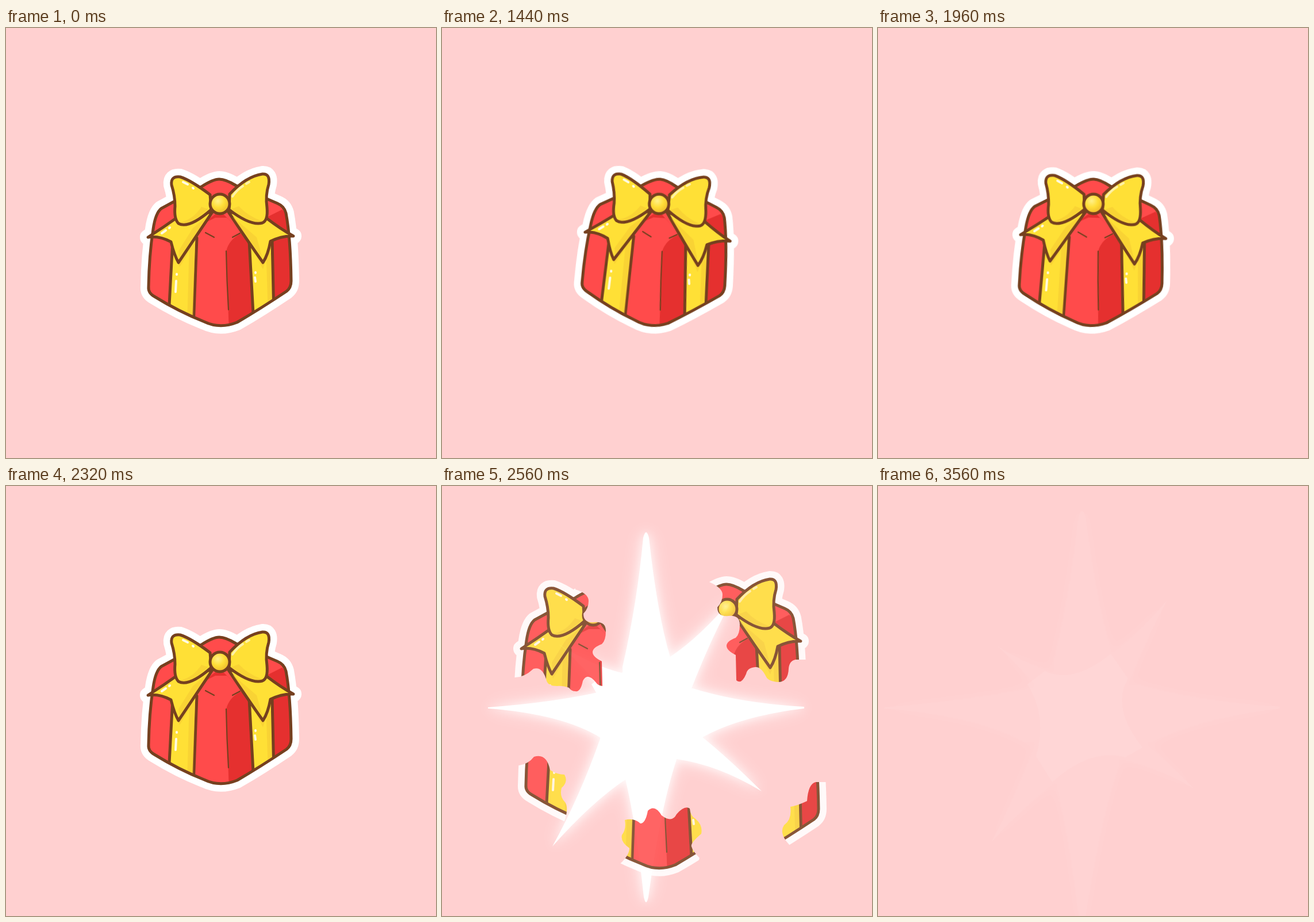
Animation, 748 px wide and 748 px high, one loop 3600 ms. Source, as an HTML page without scripts:

```html
<!DOCTYPE html>
<html lang="en">
<head>
<meta charset="utf-8">
<title>Gift burst</title>
<style>
html, body { margin: 0; width: 100%; height: 100%; overflow: hidden; background: #ffd0d0; }
svg { display: block; width: 100vw; height: 100vh; }
#gift { filter: blur(.6px); }
.line { stroke: #75401f; stroke-width: 5; stroke-linejoin: round; stroke-linecap: round; }
.thin { fill: none; stroke: #75401f; stroke-width: 2.2; stroke-linecap: round; }
.gold { fill: #ffe036; }
.shade { fill: #f4c832; opacity: .5; }
.shine { fill: none; stroke: #fffbe4; stroke-width: 4; stroke-linecap: round; }
.rim { fill: #fff; stroke: #fff; stroke-width: 28; stroke-linejoin: round; }

.gift { transform-origin: 374px 386px; animation: shake 3.6s infinite, gone 3.6s step-end infinite; }
.piece {
  transform: translate(calc(var(--x) * var(--k)), calc(var(--y) * var(--k)));
  animation: fly 3.6s step-end infinite;
}
.star { filter: drop-shadow(0 0 8px #fffc) drop-shadow(0 0 15px #fff9); animation: fade 3.6s infinite; --end: .08; }
.core { animation: fade 3.6s infinite; --end: .07; }
.ray { transform-origin: 355px 386px; animation: grow 3.6s infinite; }

@keyframes shake {
  0%, 30%, 44.444%, 50%, 64.444%, 100% { transform: rotate(0deg); animation-timing-function: steps(2); }
  32.222%, 52.222% { transform: rotate(8deg); animation-timing-function: steps(4); }
  36.667%, 56.667% { transform: rotate(-4deg); animation-timing-function: steps(3); }
  40%, 60% { transform: rotate(4deg); animation-timing-function: steps(2); }
  42.222%, 62.222% { transform: rotate(-2deg); animation-timing-function: steps(2); }
}
@keyframes gone {
  0% { opacity: 1; }
  65.556%, 100% { opacity: 0; }
}
@keyframes fly {
  0% { --k: 0; opacity: 0; }
  65.556% { --k: .03; opacity: 1; }
  66.667% { --k: .11; opacity: 1; }
  67.778% { --k: .25; opacity: 1; }
  68.889% { --k: .44; opacity: 1; }
  70% { --k: .69; opacity: 1; }
  71.111% { --k: 1; opacity: .86; }
  72.222% { --k: 1.31; opacity: .71; }
  73.333% { --k: 1.56; opacity: .57; }
  74.444% { --k: 1.75; opacity: .43; }
  75.556% { --k: 1.89; opacity: .28; }
  76.667% { --k: 1.97; opacity: .14; }
  77.778%, 100% { --k: 2; opacity: 0; }
}
@keyframes grow {
  0%, 66.667% { transform: scale(.25); animation-timing-function: steps(4); }
  71.111% { transform: scale(1); animation-timing-function: steps(9); }
  81.111%, 100% { transform: scale(var(--sx), var(--sy)); }
}
@keyframes fade {
  0% { opacity: 0; animation-timing-function: step-end; }
  66.667% { opacity: 1; animation-timing-function: step-end; }
  75.556% { opacity: 1; animation-timing-function: steps(5); }
  81.111% { opacity: .75; animation-timing-function: steps(7); }
  88.889% { opacity: .35; animation-timing-function: steps(9); }
  98.889%, 100% { opacity: var(--end); }
}
</style>
</head>
<body>
<svg viewBox="0 0 748 748">
  <defs>
    <path id="box" d="M371 263Q382 263 400 274L472 305Q484 310 487 322Q495 365 496 440Q496 452 488 458Q440 490 402 512Q372 524 345 511Q300 493 258 467Q247 461 248 450Q249 395 256 350Q260 322 270 314L340 276Q360 263 371 263Z"/>
    <path id="tailL" d="M359 320L300 408Q293 396 287 372Q266 361 247 364Q275 346 300 328Z"/>
    <path id="tailR" d="M387 320Q420 370 447 408Q456 394 460 371Q480 361 500 362Q478 350 452 330Z"/>
    <path id="bowL" d="M355 290Q322 265 303 259Q286 257 288 273Q294 292 294 310Q292 332 300 340Q318 350 357 316Z"/>
    <path id="bowR" d="M389 289Q418 258 446 254Q460 253 457 272Q451 291 454 312Q456 335 446 339Q426 345 388 316Z"/>
    <clipPath id="inBox"><use href="#box"/></clipPath>
    <radialGradient id="ball" cx=".4" cy=".35" r=".65">
      <stop offset="0" stop-color="#fff08a"/><stop offset=".5" stop-color="#ffde38"/><stop offset="1" stop-color="#eebb2c"/>
    </radialGradient>

    <g id="gift">
      <g class="rim">
        <use href="#box"/><use href="#tailL"/><use href="#tailR"/><use href="#bowL"/><use href="#bowR"/>
      </g>
      <use href="#box" fill="#ff4b4b"/>
      <g clip-path="url(#inBox)">
        <path fill="#e5302f" d="M383 388Q388 368 408 358L500 365V460L402 530H388Z"/>
        <path fill="#e5302f" d="M448 332L480 316L500 330V362ZM340 342L372 318L400 345L384 330L364 330Z"/>
        <path class="gold line" d="M290 370L283 500L326 520L332 365Z"/>
        <path class="shade" d="M319 375L315 515H325L329 375Z"/>
        <path class="gold line" d="M423 370L431 515L466 500L463 370Z"/>
        <path class="shade" d="M452 380L456 500H463L460 380Z"/>
        <path class="shade" d="M292 385L328 372L302 416ZM425 375L460 380L447 420Z"/>
      </g>
      <path class="thin" d="M383 388Q384 440 387 490M347 356L362 364M407 357L394 364"/>
      <use href="#box" class="line" fill="none"/>
      <path class="shine" d="M297 428V429M296 440L295 459M434 425V426M433 434L434 441"/>
      <use href="#tailL" class="gold line"/>
      <use href="#tailR" class="gold line"/>
      <path class="shade" d="M352 326L302 400L300 388L325 348ZM394 328L440 392L446 400L436 364Z"/>
      <path class="shine" d="M271 357L278 352M284 348L285 347"/>
      <use href="#bowL" class="gold line"/>
      <use href="#bowR" class="gold line"/>
      <path class="shade" d="M352 315Q318 345 302 338Q325 334 340 311ZM392 315Q425 342 446 336Q420 327 405 310Z"/>
      <path class="shine" d="M308 268L316 272M325 278L326 279"/>
      <path class="shine" opacity=".65" d="M394 293Q402 281 412 275M418 271L423 268"/>
      <circle class="line" cx="372" cy="306" r="17" fill="url(#ball)"/>
    </g>

    <clipPath id="topL"><path d="M200 200H341V261Q364 268 364 281T355 303Q355 320 374 318Q394 316 394 333T387 356Q371 362 371 370T387 386L388 429Q380 428 377 423Q362 404 354 420Q350 440 341 438Q334 438 330 432Q318 428 309 429Q294 429 291 420Q284 394 268 399Q252 414 236 414H200Z"/></clipPath>
    <clipPath id="topR"><path d="M336 200H560V394H491Q480 396 479 410Q478 433 461 433Q444 432 440 424Q431 406 421 407Q407 408 405 419Q397 438 388 430L387 386Q371 378 371 370T387 356Q394 350 394 333T374 318Q355 320 355 303Q364 294 364 281T336 257Z"/></clipPath>
    <clipPath id="lowL"><path d="M200 416H236Q252 414 262 401Q284 394 290 424Q302 432 315 432Q322 445 310 455Q306 470 316 480Q322 488 317 507L306 540H200Z"/></clipPath>
    <clipPath id="lowR"><path d="M560 393H491Q478 396 476 426Q459 434 447 436Q450 458 436 468Q428 480 440 496L460 520H560Z"/></clipPath>
    <clipPath id="low"><path d="M300 550L306 510Q322 495 322 483Q306 472 309 460Q317 450 314 434Q330 430 341 440Q350 440 354 418Q366 406 378 426Q396 440 404 424Q418 408 427 414Q428 427 437 432Q450 443 447 458Q428 474 430 480Q432 488 444 500L430 550Z"/></clipPath>
  </defs>

  <g class="star" fill="#fff">
    <path class="ray" style="--sx:1.2;--sy:1.12" d="M350 90Q355 71 360 90Q374 220 397 298L408 476Q380 560 359 715Q355 733 351 715Q338 590 319 510L314 315Q340 200 350 90Z"/>
    <path class="ray" style="--sx:1.25;--sy:1.15" d="M80 385Q200 376 284 356L436 352Q520 378 630 384V387Q520 400 453 437L276 438Q210 397 80 387Z"/>
    <path class="ray" style="--sx:.97;--sy:.97" d="M397 297Q450 262 508 192Q470 260 434 352L453 437Q500 475 556 531Q480 485 408 475L320 510Q260 550 192 627Q240 540 275 440L282 358Q250 318 203 275Q260 312 312 325Z"/>
  </g>
  <g class="core" fill="#fff">
    <path class="ray" style="--sx:1;--sy:1" d="M290 322Q340 345 405 292L435 335Q405 385 460 455L430 472Q370 455 303 515L275 470Q295 400 260 345Z"/>
  </g>

  <g class="piece" style="--x:-109px;--y:-81px"><use href="#gift" clip-path="url(#topL)"/></g>
  <g class="piece" style="--x:124px;--y:-92px"><use href="#gift" clip-path="url(#topR)"/></g>
  <g class="piece" style="--x:-102px;--y:70px"><use href="#gift" clip-path="url(#lowL)"/></g>
  <g class="piece" style="--x:159px;--y:122px"><use href="#gift" clip-path="url(#lowR)"/></g>
  <g class="piece" style="--x:4px;--y:147px"><use href="#gift" clip-path="url(#low)"/></g>
  <g class="gift"><use href="#gift"/></g>
</svg>
</body>
</html>
```
